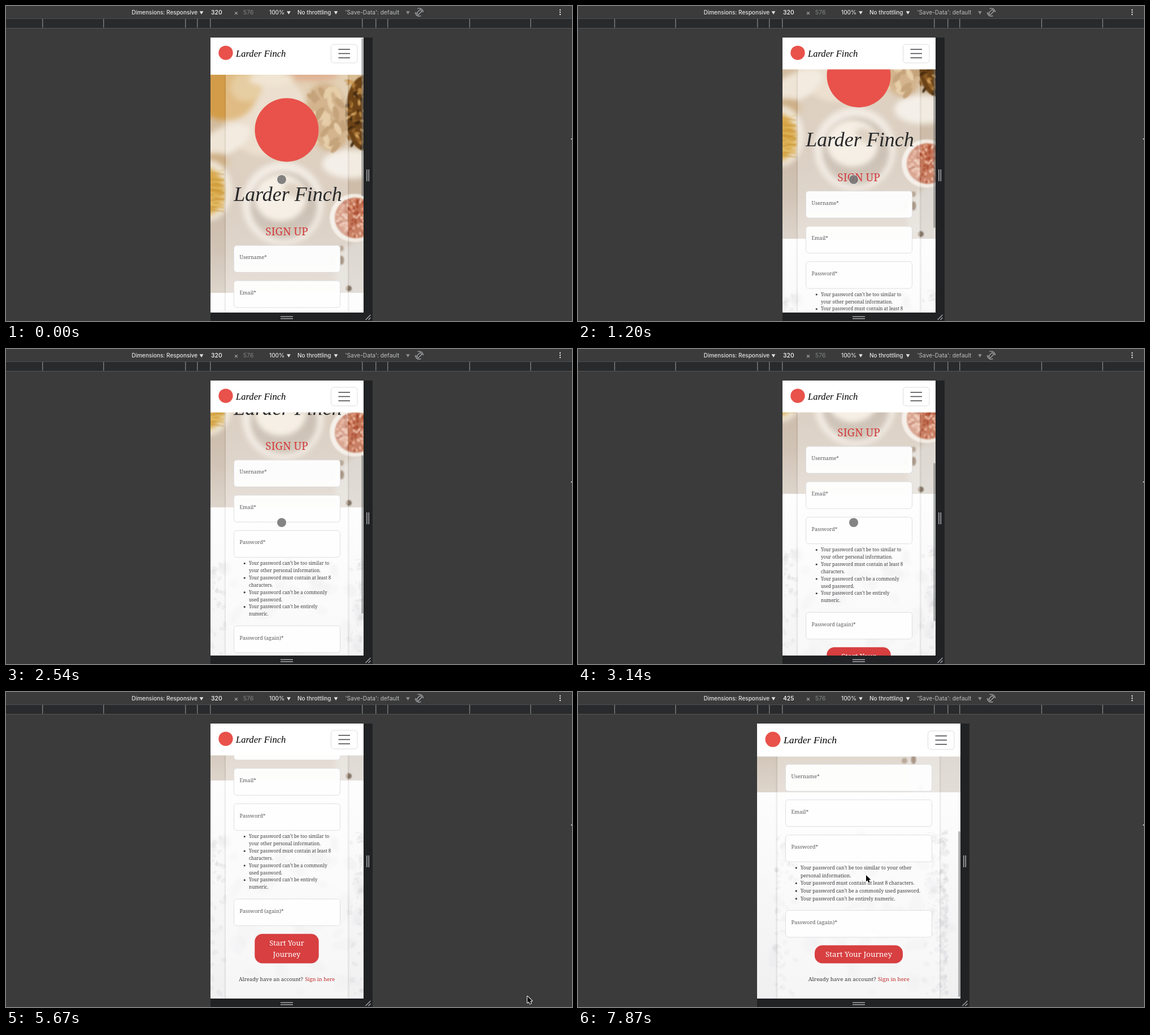
An HTML page with a canvas that plays this animation: 1002 px wide and 559 px high, repeating every 8000 ms.

```html
<!DOCTYPE html>
<html lang="en">
<head>
<meta charset="utf-8">
<title>Responsive sign-up page</title>
<style>
html, body { margin: 0; width: 100%; height: 100%; overflow: hidden; background: #3b3b3b; }
canvas { display: block; width: 100vw; height: 100vh; }
</style>
</head>
<body>
<canvas id="stage" width="1002" height="559"></canvas>
<script>
const LOOP = 8000, BRAND = 'Larder Finch';
const SERIF = '"Noto Serif", serif', SCRIPT = '"Liberation Serif", serif', UI = 'Inter, sans-serif';
const RED = '#d73f40', LOGO = '#e8524b', INK = '#27282a';
const MID = 497, TOP = 56, BOTTOM = 544, MAX_SCROLL = 352;
const RULES = [
  "Your password can’t be too similar to your other personal information.",
  "Your password must contain at least 8 characters.",
  "Your password can’t be a commonly used password.",
  "Your password can’t be entirely numeric."
];

// Bursts of screen updates: start, end, number of updates
const BURSTS = [
  [0, 0, 1], [300, 1200, 7], [1350, 1350, 1], [1650, 2690, 8], [2840, 2840, 1], [3140, 3580, 4],
  [4030, 4180, 2], [4630, 5670, 8], [5820, 6420, 5], [7000, 7000, 1], [7570, 7870, 3]
];
const SCROLL = [
  [0, 0], [150, 0], [300, 5], [600, 38], [900, 77], [1200, 96.5], [1350, 98], [1500, 98],
  [1650, 110], [1950, 170], [2240, 207], [2540, 228], [2840, 232], [2990, 232],
  [3140, 252], [3290, 302], [3440, 340], [3580, MAX_SCROLL]
];
const POINTER = [
  [4180, 488, 308], [4630, 512, 316], [5080, 690, 400], [5670, 923, 540], [5820, 928, 546],
  [6120, 700, 340], [6420, 402, 92], [7000, 349, 31], [7570, 328, 31], [7720, 420, 190], [7870, 510, 325]
];

const stage = document.getElementById('stage');
let c = stage.getContext('2d');
const lerp = (a, b, k) => a + (b - a) * k;

function lastUpdate(t) {
  const [start, end, n] = BURSTS.filter(b => b[0] <= t + 0.5).pop();
  if (n < 2) return start;
  const step = (end - start) / (n - 1);
  return start + step * Math.min(n - 1, Math.floor((t - start + 0.5) / step));
}

function track(rows, t) {
  const i = rows.findIndex(r => r[0] > t);
  if (i < 0) return rows[rows.length - 1].slice(1);
  if (i === 0) return rows[0].slice(1);
  const a = rows[i - 1], b = rows[i], k = (t - a[0]) / (b[0] - a[0]);
  return a.slice(1).map((v, j) => lerp(v, b[j + 1], k));
}

function random(seed) {
  return () => (seed = (seed * 16807) % 2147483647) / 2147483647;
}

function rect(x, y, w, h, color) {
  c.fillStyle = color;
  c.fillRect(x, y, w, h);
}

function rounded(x, y, w, h, r, fill, stroke) {
  c.beginPath();
  c.roundRect(x, y, w, h, r);
  c.fillStyle = fill;
  c.fill();
  if (!stroke) return;
  c.strokeStyle = stroke;
  c.lineWidth = 1;
  c.stroke();
}

function oval(x, y, rx, ry, color, turn = 0) {
  c.beginPath();
  c.ellipse(x, y, rx, ry, turn, 0, 7);
  c.fillStyle = color;
  c.fill();
}

function line(x1, y1, x2, y2, color, width) {
  c.beginPath();
  c.moveTo(x1, y1);
  c.lineTo(x2, y2);
  c.strokeStyle = color;
  c.lineWidth = width;
  c.stroke();
}

function text(str, x, y, font, color, align = 'left') {
  c.font = font;
  c.fillStyle = color;
  c.textAlign = align;
  c.fillText(str, x, y);
}

function wrap(str, max) {
  const lines = [''];
  for (const word of str.split(' ')) {
    const last = lines[lines.length - 1];
    if (last && last.length + 1 + word.length > max) lines.push(word);
    else lines[lines.length - 1] = last ? last + ' ' + word : word;
  }
  return lines;
}

// Draws once into a layer whose left edge is at x = 315
function layer(height, draw) {
  const el = document.createElement('canvas');
  el.width = 364;
  el.height = height;
  const main = c;
  c = el.getContext('2d');
  c.translate(-315, 0);
  draw();
  c = main;
  return el;
}

// Table with pasta, a flour bowl and a salt bowl
const hero = layer(387, () => {
  const rnd = random(11);
  const base = c.createLinearGradient(0, 0, 0, 387);
  base.addColorStop(0, '#d9bd93');
  base.addColorStop(0.4, '#cfbda8');
  base.addColorStop(0.8, '#cabbab');
  base.addColorStop(1, '#d2c6ba');
  rect(315, 0, 364, 387, base);

  c.filter = 'blur(5px)';
  oval(460, 70, 75, 75, '#e4d3bc');
  oval(385, 30, 58, 50, '#d39c48', 0.3);
  oval(425, 22, 28, 26, '#dcb878');
  oval(385, 118, 52, 24, '#efe5d6', -0.45);
  oval(368, 155, 30, 16, '#cdae85');
  oval(540, 2, 48, 9, '#d18f63');
  oval(470, 8, 40, 12, '#ecdcc2');
  oval(358, 205, 42, 54, '#eee5d6');
  oval(354, 207, 32, 42, '#d9a847');
  oval(570, 75, 38, 62, '#bf9259', -0.2);
  oval(612, 158, 52, 26, '#f1ebe1');
  oval(490, 228, 72, 74, '#efe7dd');
  oval(492, 232, 59, 60, '#b5a594');
  oval(486, 218, 46, 42, '#f4ebdd');
  oval(512, 205, 22, 12, '#cfbfab', 0.4);
  oval(640, 350, 58, 60, '#d9d4cd');

  c.filter = 'blur(1px)';
  oval(634, 68, 33, 66, '#6d4417');
  for (let i = 0; i < 90; i++) {
    oval(604 + rnd() * 56, 8 + rnd() * 120, 5.5, 2.4, ['#b8823d', '#8d5c25', '#432a10', '#d1a05d'][i % 4], rnd() * 3);
  }
  for (let i = 0; i < 30; i++) oval(538 + rnd() * 58, 25 + rnd() * 108, 12, 5, i % 2 ? '#a9783c' : '#dcb983', rnd() * 3);
  oval(617, 254, 44, 43, '#f3ece3');
  oval(619, 254, 37, 36, '#c47355');
  for (let i = 0; i < 110; i++) {
    const a = rnd() * 6.3, r = Math.sqrt(rnd()) * 34;
    oval(619 + r * Math.cos(a), 254 + r * Math.sin(a), 3, 2, ['#e3a084', '#a9492d', '#edbfa8'][i % 3], a);
  }
  for (let i = 0; i < 30; i++) {
    const y = 170 + rnd() * 70;
    line(362, y, 386, y + rnd() * 24 - 12, i % 2 ? '#e8c573' : '#c99438', 1.3);
  }
  oval(594, 329, 4.5, 8, '#5b3d22');
  oval(578, 331, 5, 5, '#7d5e41');
  oval(594, 308, 4, 5, '#81654a');
  oval(607, 379, 5, 5, '#3d2814');
  oval(605, 378, 1.8, 2, '#94744f');
});

const paper = layer(400, () => {
  const rnd = random(77);
  const shade = c.createLinearGradient(0, 0, 0, 400);
  shade.addColorStop(0, '#fefefe');
  shade.addColorStop(0.4, '#f9f9f9');
  shade.addColorStop(1, '#f0f0f1');
  rect(315, 0, 364, 400, shade);
  c.filter = 'blur(2px)';
  for (let i = 0; i < 55; i++) {
    const y = 120 + rnd() * 280;
    oval(345 + rnd() * 300, y, 5 + rnd() * 24, 4 + rnd() * 9, 'rgba(218,219,222,.2)', rnd() * 3);
  }
  c.filter = 'blur(0.7px)';
  for (let i = 0; i < 260; i++) {
    const right = rnd() < 0.72, far = rnd() * rnd() * 50;
    const y = 105 + rnd() * 290;
    oval(right ? 653 - far : 350 + far, y, 1 + rnd() * 4, 1 + rnd() * 6, 'rgba(195,197,200,.17)', rnd() * 3);
  }
});

function arrowDown(x, color) {
  c.beginPath();
  c.moveTo(x - 3.3, 9.3);
  c.lineTo(x + 3.3, 9.3);
  c.lineTo(x, 15);
  c.fillStyle = color;
  c.fill();
}

function toolbar(width) {
  const font = '500 10px ' + UI, light = '#e4e5e7', dim = '#b4b6b9';
  rect(0, 0, 1002, 559, '#3b3b3b');
  rect(0, 22, 1002, 17, '#282a2c');
  rect(0, 22, 1002, 1, '#4d4f51');
  rect(0, 39, 1002, 1, '#575859');
  for (const x of [64, 172, 317, 338, 361, 630, 654, 675, 820, 928]) rect(x, 23, 1.5, 15.5, '#77797b');
  rect(1000.5, 235, 1.5, 2, '#e8e8e8');
  text('Dimensions: Responsive', 222.5, 15, font, light);
  text(width, 363, 15, '500 10.4px ' + UI, '#fff');
  text('×', 403.5, 15.5, '12px ' + UI, dim);
  text('576', 420, 15, '10.4px ' + UI, '#818386');
  text('100%', 466, 15, font, light);
  text('No throttling', 516, 15, font, light);
  text("'Save-Data': default", 600.5, 15, '10.2px ' + UI, '#bdbfc2');
  for (const x of [346, 500.5, 584]) arrowDown(x, light);
  arrowDown(711.5, '#8b8d90');
  for (const y of [7, 11, 15]) oval(981, y, 1.2, 1.2, light);

  c.save();
  c.translate(731.5, 11);
  c.rotate(Math.PI / 4);
  c.strokeStyle = dim;
  c.lineWidth = 1.2;
  c.strokeRect(-2.2, -4.5, 4.4, 9);
  for (const a of [0.35, 3.5]) {
    c.beginPath();
    c.arc(0, 0, 7, a, a + 2);
    c.stroke();
  }
  c.restore();
}

function resizers(left, right) {
  const grip = '#a5a7a9';
  rect(left, BOTTOM, right - left + 16, 15, '#202224');
  rect(right, TOP, 16, 559 - TOP, '#202224');
  for (const x of [5, 8.5]) rect(right + x, 290, 1.6, 21, grip);
  for (const y of [550.5, 554]) rect(486, y, 22, 1.5, grip);
  line(right + 3.5, 557, right + 12.5, 548, grip, 1.5);
  line(right + 8.5, 557, right + 12.5, 553, grip, 1.5);
}

function nav(left, right, k) {
  const end = lerp(112.5, 114.5, k), y = lerp(83.7, 84.7, k);
  rect(left, TOP, right - left, end - TOP, '#fff');
  const r = lerp(12.7, 13.5, k);
  oval(left + lerp(27, 28, k), y - 0.6, r, r, LOGO);
  text(BRAND, left + lerp(45, 47, k), y + 6, `italic ${lerp(16.6, 17.7, k)}px ${SCRIPT}`, '#000');
  rounded(right - 57.5, y - 15.7, 46.5, 33, 5, '#fff', '#dcdde0');
  for (const dy of [-6.8, 0.7, 8.2]) rect(right - 44.5, y + dy - 0.8, 20.5, 1.6, '#4c4d50');
}

function field(label, x, y, w, k) {
  rounded(x + 0.5, y + 0.5, w - 1, 47.5, 5, 'rgba(254,254,254,.96)', '#dedfe1');
  text(label, x + 10.5, y + 24.8, `500 ${lerp(9, 9.4, k)}px ${SERIF}`, '#58595b');
}

function page(width, scroll) {
  const k = (width - 320) / 105;
  const half = width * 0.423, left = Math.round(MID - half), right = Math.ceil(MID + half);
  const cardL = lerp(389, 353, k), cardR = lerp(605, 640, k);
  const x = lerp(403, 367, k), w = lerp(189, 260, k);
  const wide = width === 425;
  const size = lerp(8.05, 8.55, k), lead = lerp(12.87, 13.7, k);
  const rules = RULES.map(r => wrap(r, { 320: 37, 375: 43, 425: 50 }[width]));
  const count = rules.flat().length;

  // The form is stacked upwards from the end of the page
  const buttonH = wide ? 32 : 52.3, button = 481.5 - buttonH;
  const again = button - 62.4;
  const firstRule = again - 20.5 - (count - 1) * lead;
  const password = firstRule - 58.5, user = password - 125.2;
  const heroEnd = user + lerp(84.7, 50, k);

  c.save();
  c.beginPath();
  c.rect(left, TOP, right - left, BOTTOM - TOP);
  c.clip();
  rect(left, TOP, right - left, BOTTOM - TOP, '#fff');
  c.translate(0, MAX_SCROLL - scroll);

  c.drawImage(paper, 315, 144);
  c.drawImage(hero, 315, heroEnd - 387);
  const wash = c.createLinearGradient(0, heroEnd - 150, 0, heroEnd);
  wash.addColorStop(0, 'rgba(238,232,226,0)');
  wash.addColorStop(1, 'rgba(238,234,229,.4)');
  rect(left, heroEnd - 150, right - left, 150, wash);
  rect(cardL, heroEnd - 387, cardR - cardL, 387, 'rgba(250,247,244,.34)');
  rect(cardL, heroEnd, cardR - cardL, 400, 'rgba(255,255,255,.35)');
  for (const [edge, dir] of [[cardL, -1], [cardR, 1]]) {
    const fade = c.createLinearGradient(edge, 0, edge + dir * 4, 0);
    fade.addColorStop(0, 'rgba(60,50,40,.1)');
    fade.addColorStop(1, 'rgba(60,50,40,0)');
    rect(Math.min(edge, edge + dir * 4), heroEnd - 387, 4, 900, fade);
  }

  oval(MID, user - 204.6, 56.5, 56.5, LOGO);
  text(BRAND, MID + 2, user - 79, `italic 36px ${SCRIPT}`, INK, 'center');
  text('SIGN UP', MID, user - 17.4, `500 19px ${SERIF}`, '#d23c3c', 'center');
  field('Username*', x, user, w, k);
  field('Email*', x, user + 62.6, w, k);
  field('Password*', x, password, w, k);

  let y = firstRule + 3;
  for (const lines of rules) {
    oval(x + 19.3, y - 2.7, 1.6, 1.6, '#3c3d3f');
    for (const str of lines) {
      text(str, x + 27, y, `${size}px ${SERIF}`, '#3c3d3f');
      y += lead;
    }
  }
  field('Password (again)*', x, again, w, k);

  const bw = w * 0.6, label = `500 ${lerp(12.9, 13.4, k)}px ${SERIF}`;
  rounded(MID - bw / 2, button, bw, buttonH, 13.5, RED);
  if (wide) text('Start Your Journey', MID, button + 20.5, label, '#fff', 'center');
  else {
    text('Start Your', MID, button + 20.6, label, '#fff', 'center');
    text('Journey', MID, button + 41, label, '#fff', 'center');
  }
  const foot = `${lerp(9.25, 9.75, k)}px ${SERIF}`;
  text('Already have an account?', lerp(526, 527.5, k), 513, foot, '#37383a', 'right');
  text('Sign in here', lerp(529.5, 531, k), 513, foot, '#c02b2b');
  c.restore();

  nav(left, right, k);
  resizers(left, right);
  return { left, right, k };
}

function scrollbar(right, k, scroll, alpha) {
  const len = lerp(281, 294, k);
  const y = lerp(TOP + 1, 541 - len, scroll / MAX_SCROLL);
  rounded(right - 3.6, y, 3.2, len, 1.6, `rgba(110,112,114,${0.6 * alpha})`);
}

function touch(x, y) {
  oval(x, y, 9, 9, 'rgba(255,255,255,.55)');
  oval(x, y, 8, 8, 'rgba(85,85,85,.72)');
}

function arrow(x, y) {
  c.beginPath();
  for (const [dx, dy] of [[0, 0], [0, 11.5], [2.6, 9.2], [4.5, 13.4], [6.7, 12.4], [4.9, 8.4], [8.4, 8.2]]) c.lineTo(x + dx, y + dy);
  c.closePath();
  c.lineJoin = 'round';
  c.strokeStyle = '#fff';
  c.lineWidth = 2;
  c.stroke();
  c.fillStyle = '#000';
  c.fill();
}

function draw(now) {
  const t = lastUpdate(now % LOOP);
  const width = t < 7000 ? 320 : t < 7570 ? 375 : 425;
  const [scroll] = track(SCROLL, t);
  const [px, py] = track(POINTER, t);
  const barAlpha = t < 4030 || t >= 7000 ? 1 : t < 4180 ? 0.5 : 0;

  toolbar(String(width));
  const { left, right, k } = page(width, scroll);
  if (barAlpha) scrollbar(right, k, scroll, barAlpha);

  const inside = px > left && px < right && py > TOP && py < BOTTOM;
  if (inside && t < 7000) touch(px, py);
  else arrow(px, py);
}

const begin = performance.now();
function loop() {
  draw(performance.now() - begin);
  requestAnimationFrame(loop);
}
loop();
</script>
</body>
</html>
```
